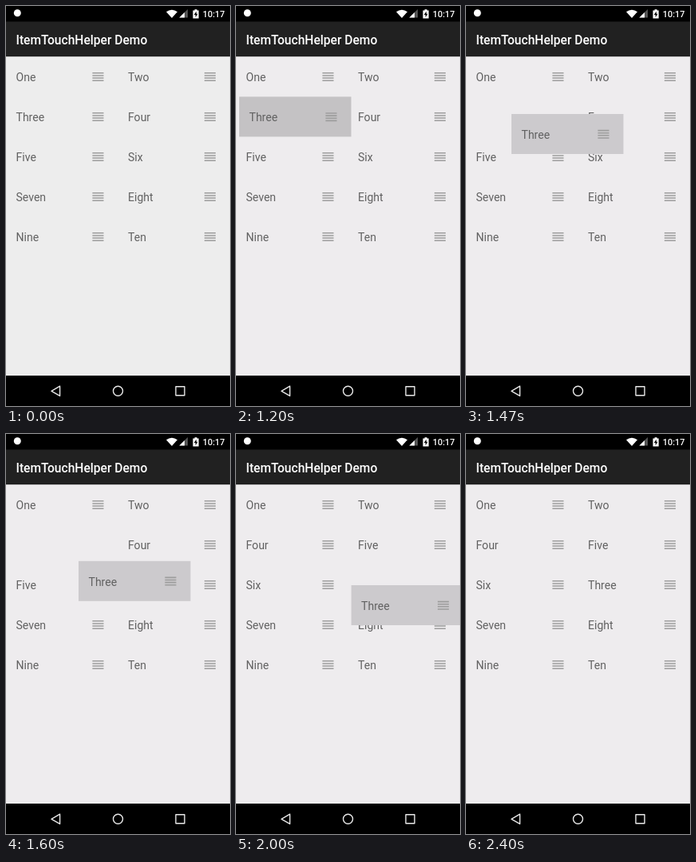
Write an HTML page that moves like this. It is 281 px wide and 500 px high and loops after 2740 ms.

```html
<!DOCTYPE html>
<html lang="en">
<head>
<meta charset="utf-8">
<title>Drag and drop grid</title>
<style>
  html, body { margin: 0; width: 100%; height: 100%; overflow: hidden; background: #000; }
  svg { display: block; width: 281px; height: 500px; font-family: Roboto, sans-serif; }
  .cell text { font-size: 14.06px; fill: #616161; }
  .cell path { stroke: #9d9d9d; stroke-width: 1.56; }
</style>
</head>
<body>
<svg viewBox="0 0 281 500">
  <rect id="page" y="63" width="281" height="399"/>
  <g id="grid"></g>
  <rect width="281" height="19.5"/>
  <rect y="19.5" width="281" height="43.7" fill="#212121"/>
  <text x="12.5" y="47.6" font-size="15.6" font-weight="500" fill="#fff">ItemTouchHelper Demo</text>

  <g fill="#fff">
    <circle cx="14.3" cy="8.8" r="4.5"/>
    <path d="M201 7.2Q208 2.2 215 7.2L208 15Z"/>
    <path d="M228 4V14.6H217.4Z" fill="#555"/>
    <path d="M224 8V14.6H217.4Z"/>
    <path d="M234.5 5.6H236.6V4.3H239.6V5.6H241.7V15.4H234.5Z"/>
    <path d="M238.8 6.7L235.8 11H237.7V14.2L240.5 9.7H238.8Z" fill="#000"/>
    <text x="246.8" y="13.8" font-size="10.9" font-weight="500">10:17</text>
  </g>

  <rect y="462" width="281" height="38"/>
  <g fill="none" stroke="#e8e8e8" stroke-width="1.4" stroke-linejoin="round">
    <path d="M67.6 475.2V487.4L57 481.3Z"/>
    <circle cx="140.5" cy="481.3" r="6"/>
    <rect x="213" y="475.8" width="11" height="11"/>
  </g>
</svg>
<script>
const LOOP = 2740, PRESS = 930, DRAG = 1200, STEP = 200 / 3, DROP = 18;
const COL = 140.5, ROW = 50, TOP = 63.2;
const names = ["One", "Two", "Three", "Four", "Five", "Six", "Seven", "Eight", "Nine", "Ten"];
const moves = { 3: 2, 4: 3, 5: 4 };   // slots that shift when "Three" lands in slot 5
const drag = [                        // dragged cell, one point per step
  [4, 113.4], [12, 115], [23.3, 118.3], [39, 125], [57, 135], [74, 147],
  [91, 158.8], [102.5, 170], [115, 175.4], [125.5, 180], [133, 184], [139.5, 187],
  [144.6, 189], [147, 190.6], [147.4, 190.6], [146.5, 189], [144.5, 180], [141.2, 168]
];

const grid = document.getElementById("grid");
const page = document.getElementById("page");
const slot = i => [i % 2 * COL, TOP + (i >> 1) * ROW];
const ease = p => (1 - Math.cos(Math.PI * Math.min(1, Math.max(0, p)))) / 2;

const cells = names.map(name => {
  const g = document.createElementNS("http://www.w3.org/2000/svg", "g");
  g.setAttribute("class", "cell");
  g.innerHTML = `<rect width="${COL}" height="${ROW}" fill="none"/>
    <text x="12.5" y="30.8">${name}</text>
    <path d="M108.4 20.6h14.1m-14.1 3.12h14.1m-14.1 3.12h14.1m-14.1 3.12h14.1"/>`;
  grid.append(g);
  return g;
});
const held = cells[2], box = held.firstChild;
grid.append(held);   // the dragged cell stays on top

function place(cell, [x, y]) {
  cell.setAttribute("transform", `translate(${x} ${y})`);
}

function boxColor(t, k) {
  if (t < PRESS || k >= DROP) return "none";
  if (k < 0) return "#cdcdcd";
  return k < 4 ? "#c4c2c4" : "#cccacd";
}

function draw(t) {
  const k = Math.floor((t - DRAG) / STEP + 0.1);
  const p = k > 7 ? ease((k - 6.72) / 3.75) : 0;
  cells.forEach((cell, i) => {
    const a = slot(i), b = slot(moves[i] ?? i);
    place(cell, a.map((v, n) => v + (b[n] - v) * p));
  });
  if (k >= 0) place(held, k < DROP ? drag[k] : slot(5));
  box.setAttribute("fill", boxColor(t, k));
  page.setAttribute("fill", k < 0 ? "#ededed" : "#eeecee");
}

const start = performance.now();
function tick() {
  draw((performance.now() - start) % LOOP);
  requestAnimationFrame(tick);
}
tick();
</script>
</body>
</html>
```
